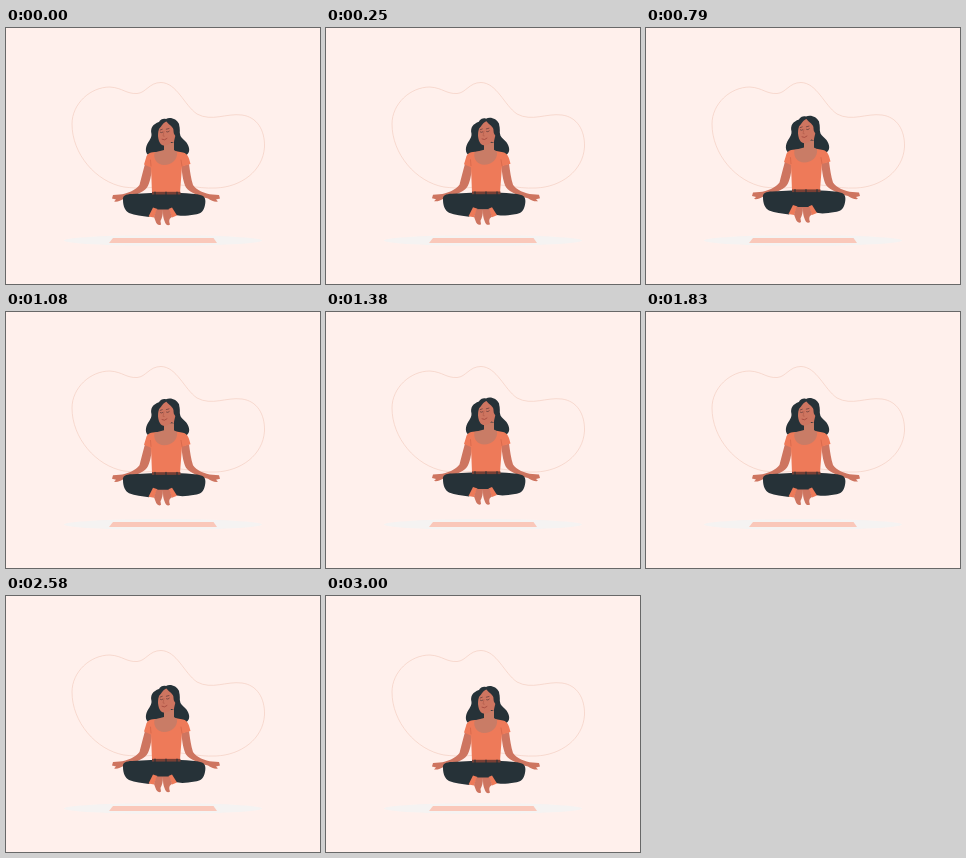
Recreate the animation shown at these times as an HTML page. Size 314 by 256 pixels, loop 3040 ms.

```html
<!DOCTYPE html>
<html lang="en">
<head>
<meta charset="utf-8">
<title>Floating meditation</title>
<style>
  html, body { margin: 0; width: 100%; height: 100%; overflow: hidden; background: #fff0ec; }
  svg { display: block; width: 314px; height: 256px; }
  .skin { fill: #ce7560; }
  .shade { fill: #c97c66; }
  .dark { fill: #263238; }
  .top { fill: #ee7a59; }
  .line { fill: none; stroke-linecap: round; stroke-linejoin: round; }
</style>
</head>
<body>
<svg viewBox="0 0 314 256">
  <path d="M66 96C66 76 84 59 104 59C117 60 120 66 131 65.500C140 65 143 54.500 155 54.500C171 55 178 77 191 86C206 94 220 85 236 87C251 89 259 102 258.500 119C257 143 235 159 210 160C189 161 177 155 160 157C146 160 134 161 118 159C90 154 66 126 66 96Z"
        fill="none" stroke="#eec0b0" stroke-width=".5"/>
  <ellipse cx="157" cy="212.500" rx="99" ry="5.300" fill="#f5f3f2"/>
  <path d="M107 210H207.500L211 215H103Z" fill="#fac8ba"/>

  <g id="body">
    <!-- hair behind the shoulders -->
    <path class="dark" d="M153 94C147 96 144 100 145.500 106C146 111 141 114 140 120C139 126 143 129 149 129H175C181 128 184 125 183 120C182 114 177 112 174.500 108C173 104 174 99 172 95Z"/>

    <!-- arms and hands -->
    <path class="skin" d="M139 136L146 138C145.500 147 144 155 141 159.500C137 165 126 168.500 118 170.500C115 173 111 174 108 173.500L110 171.500L106 170.500L107 167L113.500 166.500C121 166 130 162 133.500 157C135 151 137 143 139 136Z"/>
    <path class="skin" d="M183 136L175.500 138C176 147 177.500 155 180 159.500C184 165 194 168.500 202 170.500C205 173 209 174 212 173.500L210 171.500L214 170.500L213 167L206.500 166.500C199 166 190 162 187 157C185 151 184 143 183 136Z"/>

    <!-- legs and feet -->
    <path class="dark" d="M145 165H175C182 165.500 190 165.500 196 167.500C200 169 200 174 198.500 179C197 184 194 186 189 186.500C181 187.500 175 189 169 186.500L164 182H150L143 189C136 188 129 187.500 123 185C119 183 117 178 117 172C116 168 120 166 126 166Z"/>
    <path class="top" d="M147 179.500L151.500 181L148 189.500L142.500 188.500Z"/>
    <path class="top" d="M166 179.500L162.500 181L166 189.500L171 187.500Z"/>
    <path class="skin" d="M150.500 181.500H157C157 187 156 190 154.500 193L155 196.500C153 198 150.500 196.500 149.500 193L148 189Z"/>
    <path class="skin" d="M157 181.500H163.500L166 189C163.500 190.500 162.500 192 164 196.500C162 198 159.500 197 158.500 193C157 189 157 187 157 181.500Z"/>

    <!-- shirt -->
    <path class="top" d="M149 124C143 124.500 141 126 140 130L138 136.500L145 139.500L146 165H174L176 138.500L184.500 136C183 130 182 125.500 177 124.500L169 123Z"/>
    <path class="line" d="M145 138L144.500 132M176 138L175 132" stroke="#cb6045" stroke-width=".6"/>
    <path class="shade" d="M148.500 124.500L158 122V115H168V122L171 124C172 131 166 137 158 137C152 137 147 132 148.500 124.500Z"/>
    <path d="M146 163.800H174.500V166.500H146Z" fill="#793f34"/>
    <path class="line" d="M149 164V167M160 164V167M171 164V167" stroke="#263238" stroke-width="1.100"/>

    <!-- head -->
    <path class="skin" d="M154 94C151.500 101 151 110 154 115C156.500 119 162 118 165.500 114L168 115C168 111 170 108 170 102L167 92Z"/>
    <path class="dark" d="M152 98C152 93 156 89.500 160 91C164 88.500 171 91 173 96C174 101 174 105 172 108C170 109 167.500 107 167.500 103C168 99 163 97 160.500 93.500C157 94.500 156 98 153 101C151 106 153 112 151 115C147 113 148 106 149 102Z"/>
    <path class="line" d="M154.300 104.300Q155.500 105.200 156.800 104.200M160.500 103.800Q162 104.800 163.300 103.200M154.200 102L156.200 101.300M160.300 101.200L163 100.500" stroke="#4a3033" stroke-width=".6"/>
    <path class="line" d="M158 103.500L157 108L158.300 108.200" stroke="#a95243" stroke-width=".5"/>
    <path class="line" d="M156 111.300Q158.500 113 161 110.500" stroke="#9b3f37" stroke-width=".7"/>
  </g>
</svg>
<script>
  const LOOP = 3040, RISE = 4.5;
  const body = document.getElementById("body");

  function draw(now) {
    const lift = RISE * (1 - Math.cos(now / LOOP * 2 * Math.PI)) / 2;
    body.setAttribute("transform", `translate(0 ${-lift})`);
    requestAnimationFrame(draw);
  }
  requestAnimationFrame(draw);
</script>
</body>
</html>
```
